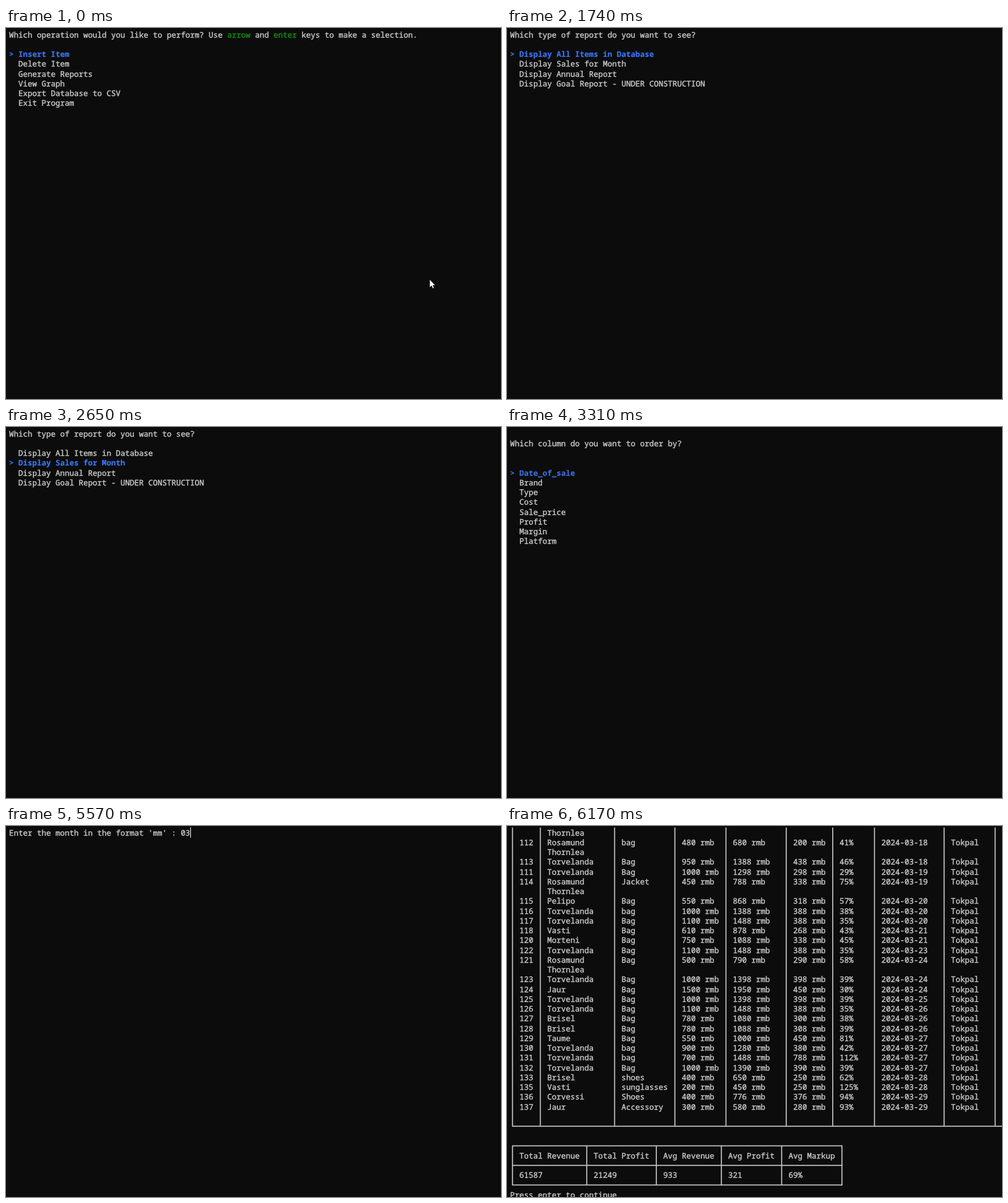
An HTML page for the animation above (8000 ms loop, 720 by 540 pixels).

```html
<!DOCTYPE html>
<html lang="en">
<head>
<meta charset="utf-8">
<title>Sales terminal</title>
<style>
  html, body { margin: 0; width: 100%; height: 100%; overflow: hidden; background: #0c0c0c; }
  svg { display: block; width: 720px; height: 540px; }
  text {
    font: 500 11.25px "Noto Sans Mono", "DejaVu Sans Mono", monospace;
    font-variant-ligatures: none;
    text-rendering: geometricPrecision;
    white-space: pre;
    color: #ccc;
    fill: currentColor;
    stroke: currentColor;
    stroke-width: .35;
  }
  .pick { color: #3b78ff; font-weight: 600; stroke-width: .1; }
  .soft { color: #3b72e2; }
  .key { color: #13900f; }
  .rule { fill: none; stroke: #c8c8c8; stroke-width: 1.5; }
</style>
</head>
<body>
<svg id="stage" viewBox="0 0 720 540" xmlns="http://www.w3.org/2000/svg"></svg>
<script>
const LOOP = 8000, CELL_W = 6.75, CELL_H = 14.25;
const left = col => 4.5 + col * CELL_W;
const midX = col => left(col) + 3.5;
const midY = row => 9.6 + row * CELL_H;

const text = (col, row, str, cls = '') =>
  `<text class="${cls}" x="${left(col)}" y="${13.6 + row * CELL_H}">${str}</text>`;
const rule = d => `<path class="rule" d="${d}"/>`;
const caret = (x, y = 2, h = 15, fill = '#e6e6e6') =>
  `<rect x="${x}" y="${y}" width="1" height="${h}" fill="${fill}"/>`;

const menu = (row, items, picked, cls = 'pick') => items.map((item, i) =>
  i === picked ? text(0, row + i, '&gt; ' + item, cls) : text(2, row + i, item)).join('');

// Main menu
const actions = ['Insert Item', 'Delete Item', 'Generate Reports', 'View Graph',
  'Export Database to CSV', 'Exit Program'];
const pointer = `<path d="M616.3 366v11.6l2.6-2.4 1.8 3.9 1.9-.9-1.8-3.7h3.5z"
  fill="#fff" stroke="#000" stroke-width=".4"/>`;
const mainMenu = picked =>
  text(0, 0, 'Which operation would you like to perform? Use <tspan class="key">arrow</tspan> and ' +
    '<tspan class="key">enter</tspan> keys to make a selection.') +
  menu(2, actions, picked) + pointer;

// Report menu
const reports = ['Display All Items in Database', 'Display Sales for Month',
  'Display Annual Report', 'Display Goal Report - UNDER CONSTRUCTION'];
const reportTitle = text(0, 0, 'Which type of report do you want to see?');
const reportMenu = picked => reportTitle + menu(2, reports, picked);

// Column menu
const columns = ['Date_of_sale', 'Brand', 'Type', 'Cost', 'Sale_price', 'Profit', 'Margin', 'Platform'];
const columnMenu = text(0, 1, 'Which column do you want to order by?') + menu(4, columns, 0, 'pick soft');

const prompt = typed => text(0, 0, "Enter the month in the format 'mm' : " + typed);

// Sales table
const edges = [0, 6, 22, 35, 46, 59, 69, 78, 93, 104];
const tableTop = prompt('03') + text(55, 1, 'Sales Data') +
  rule(`M${midX(0)} ${midY(2)}H720` + edges.map(c => `M${midX(c)} ${midY(2)}V45.3`).join('')) +
  caret(4, 31, 14, '#999');

// id, brand, type, cost, price, day of month
const sales = `112 Rosamund bag 480 680 18
113 Torvelanda Bag 950 1388 18
111 Torvelanda Bag 1000 1298 19
114 Rosamund Jacket 450 788 19
115 Pelipo Bag 550 868 20
116 Torvelanda bag 1000 1388 20
117 Torvelanda Bag 1100 1488 20
118 Vasti Bag 610 878 21
120 Morteni Bag 750 1088 21
122 Torvelanda Bag 1100 1488 23
121 Rosamund Bag 500 790 24
123 Torvelanda Bag 1000 1398 24
124 Jaur Bag 1500 1950 24
125 Torvelanda Bag 1000 1398 25
126 Torvelanda Bag 1100 1488 26
127 Brisel Bag 780 1080 26
128 Brisel Bag 780 1088 26
129 Taume Bag 550 1000 27
130 Torvelanda bag 900 1280 27
131 Torvelanda bag 700 1488 27
132 Torvelanda Bag 1000 1390 27
133 Brisel shoes 400 650 28
135 Vasti sunglasses 200 450 28
136 Corvessi Shoes 400 776 29
137 Jaur Accessory 300 580 29`;

function salesRows() {
  const wrapped = row => text(8, row, 'Thornlea');
  const starts = [2, 8, 24, 37, 48, 61, 71, 80, 95];
  let out = wrapped(0), row = 1;
  for (const line of sales.split('\n')) {
    const [id, brand, type, cost, price, day] = line.split(' ');
    const profit = price - cost;
    const cells = [id, brand, type, cost + ' rmb', price + ' rmb', profit + ' rmb',
      Math.floor(profit * 100 / cost) + '%', '2024-03-' + day, 'Tokpal'];
    out += cells.map((cell, i) => text(starts[i], row, cell)).join('');
    row++;
    if (brand === 'Rosamund') out += wrapped(row++);
  }
  return out;
}

function summary() {
  const walls = [0, 16, 31, 45, 58, 71];
  const totals = [['Total Revenue', 61587], ['Total Profit', 21249], ['Avg Revenue', 933],
    ['Avg Profit', 321], ['Avg Markup', '69%']];
  const lines = [32, 34, 36].map(r => `M${midX(0) - .7} ${midY(r)}H${midX(71) + .7}`).join('') +
    walls.map(c => `M${midX(c)} ${midY(32)}V${midY(36)}`).join('');
  return rule(lines) + totals.map(([name, value], i) =>
    text(walls[i] + 2, 33, name) + text(walls[i] + 2, 35, value)).join('');
}

const tableEnd = salesRows() +
  rule(`M${midX(0) - .7} ${midY(30)}H720` + edges.map(c => `M${midX(c)} 2.3V${midY(30)}`).join('')) +
  summary() + text(0, 37, 'Press enter to continue');

const scenes = [
  [0, mainMenu(0)],
  [500, mainMenu(1)],
  [1130, mainMenu(2)],
  [1640, ''],
  [1740, reportMenu(0)],
  [2570, reportTitle],
  [2650, reportMenu(1)],
  [3310, columnMenu],
  [4520, prompt('') + caret(254)],
  [5060, prompt('')],
  [5300, prompt('0') + caret(261)],
  [5570, prompt('03') + caret(268)],
  [6100, tableTop],
  [6170, tableEnd]
];

const stage = document.getElementById('stage');
stage.innerHTML = '<rect width="720" height="540" fill="#0c0c0c"/>' +
  scenes.map(([, body]) => `<g display="none">${body}</g>`).join('');
const groups = [...stage.querySelectorAll('g')];
let shown = -1;

function tick() {
  const t = performance.now() % LOOP;
  const now = scenes.findLastIndex(([start]) => start <= t);
  if (now !== shown) {
    groups.forEach((g, i) => g.setAttribute('display', i === now ? 'inline' : 'none'));
    shown = now;
  }
  requestAnimationFrame(tick);
}
tick();
</script>
</body>
</html>
```
